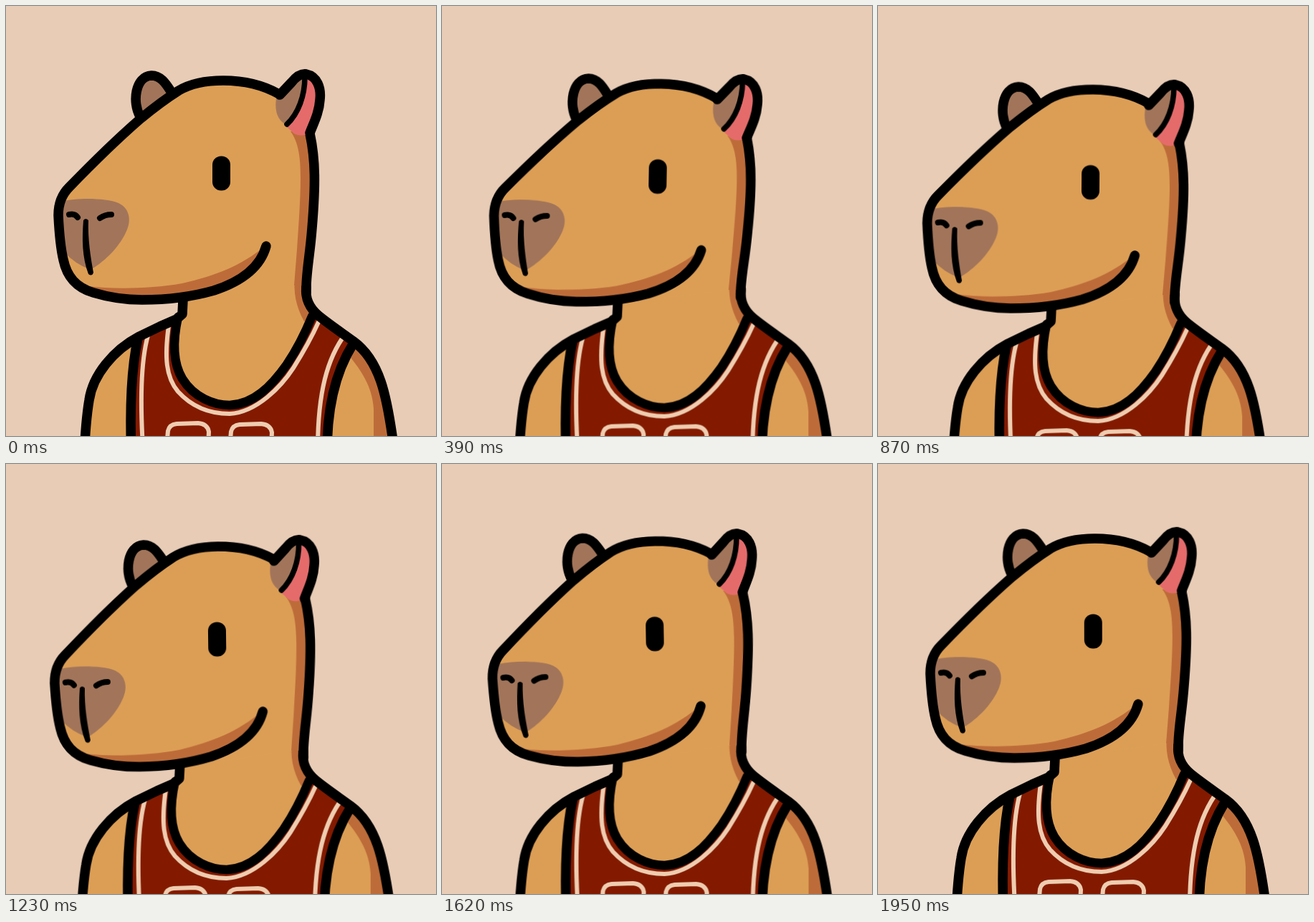
Animation, 600 px wide and 600 px high, one loop 1.98 s. Source, as an HTML page without scripts:

```html
<!DOCTYPE html>
<html lang="en">
<head>
<meta charset="utf-8">
<title>Capybara</title>
<style>
  html, body { margin: 0; width: 100%; height: 100%; overflow: hidden; background: #e8ccb6; }
  svg { display: block; width: 100vw; height: 100vh; }

  .skin { fill: #dc9e55; }
  .shade { fill: #bd6c39; }
  .brown { fill: #a2755a; }
  .pink { fill: #e56b6b; }
  .red { fill: #831a00; }
  .ink, .trim { fill: none; stroke: #000; stroke-width: 13.5; stroke-linecap: round; stroke-linejoin: round; }
  .trim { stroke: #efcdb0; stroke-width: 6; }
  .thin { stroke-width: 8; }

  .sink, .tilt { animation: sink 990ms cubic-bezier(.364, 0, .636, 1) infinite alternate; }
  .tilt { animation-name: tilt; animation-delay: -495ms; transform-origin: 295px 360px; }
  .body { --x: -5px; --y: 10.5px; }
  .head { --x: -5px; --y: 13px; }
  .far { --x: -4px; --y: 4px; }
  .near { --x: -1px; --y: 1.4px; }
  @keyframes sink { from { transform: translate(0, 0); } to { transform: translate(var(--x), var(--y)); } }
  @keyframes tilt { from { transform: rotate(-1.05deg); } to { transform: rotate(1.05deg); } }
</style>
</head>
<body>
<svg viewBox="0 0 600 600">
  <defs>
    <path id="face" d="M381 123C360 111 332 104 303 104C278 104 258 108 241 118C222 130 205 143 188 157C150 190 118 222 88 253C76 265 73 278 73 292C74 312 75 333 80 354C85 378 98 393 122 400C145 407 168 410 190 410C225 410 262 405 290 397C330 384 355 364 363 335"/>
    <path id="digit" d="M224 615L226 593Q228 584 238 583L268 582Q281 583 283 594L282 615"/>
  </defs>

  <g class="sink body">
    <!-- arms and neck -->
    <path class="skin" d="M247 380V428L186 461C150 480 121 515 116 550Q111 580 109 630H540C535 560 522 495 485 468C440 438 420 425 419 380Z"/>
    <path class="shade" d="M478 487C495 508 511 530 513 562V630H542C536 550 525 500 485 468Z"/>
    <path class="shade" d="M403 375C401 400 404 418 416 440L432 432L419 410V375Z"/>

    <!-- jersey -->
    <path class="red" d="M184 463L240 434C232 470 234 500 246 520C262 546 290 557 312 557C345 556 370 531 392 500C408 476 418 455 427 433L484 470C460 510 447 560 448 630H175C172 550 176 500 184 463Z"/>
    <g class="trim">
      <path d="M227 446C221 490 223 518 240 538C260 560 285 569 312 569C350 567 384 531 401 505Q423 470 436 441M198 460C187 500 187 560 192 630M469 464C445 500 434 550 435 630"/>
      <use href="#digit"/>
      <use href="#digit" x="88" y="1"/>
    </g>

    <!-- outlines -->
    <g class="ink">
      <path d="M184 464C176 500 172 550 175 630M484 472C460 510 447 560 448 630"/>
      <path style="stroke-width:12.5" d="M240 434C232 470 234 500 246 520C262 546 290 557 312 557C345 556 370 531 392 500C408 476 418 455 427 433"/>
      <path d="M247 410L246 430L238 437L215 447L186 461C150 480 121 515 116 550Q111 580 109 630"/>
      <path d="M419 392C417 408 424 422 436 432C452 445 470 457 485 468C522 495 531 545 539 600L542 630"/>
    </g>
  </g>

  <g class="sink head"><g class="tilt">
    <g class="sink far">
      <path class="brown" d="M185 152C176 135 180 98 203 97C217 97 224 110 231 121L230 145Z"/>
      <path class="ink" d="M187 154C176 135 180 98 203 97C217 97 224 110 232 122"/>
    </g>

    <use href="#face" class="skin"/>
    <path class="skin" d="M303 104L381 123L424 176C431 215 432 250 427 310C424 350 419 375 418 388L300 405V300Z"/>
    <path class="shade" d="M397 175C408 190 411 210 411 240C411 270 408 310 406 340L402 390H418C419 375 424 350 427 310C432 250 431 215 424 176Z"/>
    <path class="shade" d="M114 391C150 395 200 395 246 387C290 377 330 362 361 335C355 365 330 384 290 397C240 410 150 410 114 391Z"/>
    <path class="brown" d="M77 273C100 267 140 268 157 275C172 282 175 298 169 312C160 334 140 355 118 368Q96 360 81 343L74 300Z"/>
    <path d="M108 299Q111 295 115 299C114 325 118 350 122 372Q120 378 115 374C106 350 106 325 108 299Z"/>
    <path class="ink thin" d="M88 291Q96 289 100 295M131 296Q138 291 147 291"/>
    <rect x="288" y="209.5" width="25" height="48" rx="12"/>
    <use href="#face" class="ink"/>
    <path class="ink" d="M424 178C432 215 432 250 427 310C424 350 418 375 419 400"/>

    <g class="sink near">
      <path class="brown" d="M377 129L414 97C417 125 410 148 393 167Q373 158 377 129Z"/>
      <path class="pink" d="M417 98C440 100 440 130 432 150L422 178Q412 183 402 178L390 167C412 148 418 125 417 98Z"/>
      <path class="ink" style="stroke-width:7.5" d="M417 99C417 125 408 150 392 165"/>
      <path class="ink" d="M382 124L398 107C406 97 412 94 419 95C434 98 440 114 438 131C437 148 430 162 424 177"/>
    </g>
  </g></g>
</svg>
</body>
</html>
```
